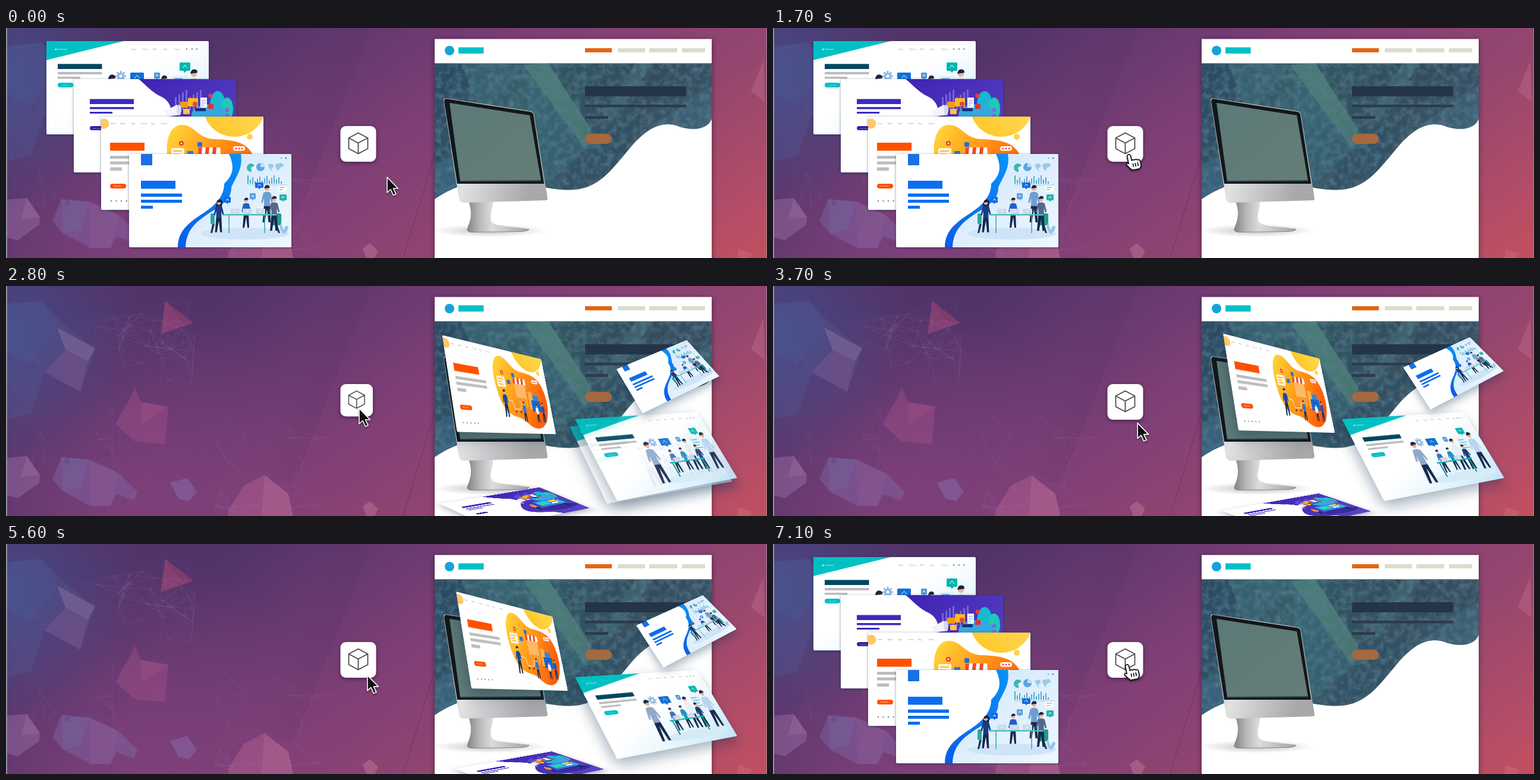
Animation of 1280x387 px, one loop 7.2 s. Source, as an HTML page:

```html
<!DOCTYPE html>
<html lang="en">
<head>
<meta charset="utf-8">
<title>Page designs</title>
<style>
html, body { margin: 0; width: 100%; height: 100%; overflow: hidden; background: #6d3d74; }
#stage { position: absolute; left: 0; top: 0; width: 1280px; height: 387px; overflow: hidden; }
#stage > svg { position: absolute; left: 0; top: 0; }
.card { position: absolute; left: 0; top: 0; width: 273px; height: 157px; border-radius: 2px;
  overflow: hidden; background: #fff; transform-origin: 0 0; }
.card svg { display: block; }
text { font-family: "Open Sans", sans-serif; }
</style>
</head>
<body>
<div id="stage">
<svg id="scene" width="1280" height="387" viewBox="0 0 1280 387">
  <defs>
    <linearGradient id="sky" gradientUnits="userSpaceOnUse" x1="450" y1="-30" x2="950" y2="670">
      <stop offset="0" stop-color="#52346a"/><stop offset=".35" stop-color="#7f3f76"/>
      <stop offset=".62" stop-color="#95466f"/><stop offset=".85" stop-color="#b44d67"/>
      <stop offset="1" stop-color="#c85058"/>
    </linearGradient>
    <radialGradient id="blueGlow" gradientUnits="userSpaceOnUse" cx="0" cy="80" r="220">
      <stop offset="0" stop-color="#41528e" stop-opacity=".7"/><stop offset="1" stop-color="#41528e" stop-opacity="0"/>
    </radialGradient>
    <radialGradient id="plumGlow" gradientUnits="userSpaceOnUse" cx="220" cy="350" r="320">
      <stop offset="0" stop-color="#82417c" stop-opacity=".75"/><stop offset="1" stop-color="#82417c" stop-opacity="0"/>
    </radialGradient>
    <linearGradient id="fold" gradientUnits="userSpaceOnUse" x1="490" y1="130" x2="558" y2="157">
      <stop offset="0" stop-color="#3c2858" stop-opacity="0"/><stop offset="1" stop-color="#3c2858" stop-opacity=".12"/>
    </linearGradient>
    <linearGradient id="hero" x1="0" y1="0" x2="1" y2=".25">
      <stop offset="0" stop-color="#2b4a60"/><stop offset=".42" stop-color="#38626c"/>
      <stop offset=".75" stop-color="#364f5e"/><stop offset="1" stop-color="#3a5668"/>
    </linearGradient>
    <linearGradient id="screen" x1="0" y1="0" x2="1" y2="1">
      <stop offset="0" stop-color="#5b7a78"/><stop offset="1" stop-color="#667d77"/>
    </linearGradient>
    <linearGradient id="chin" x1="0" y1="0" x2="1" y2=".3">
      <stop offset="0" stop-color="#a6a6a8"/><stop offset=".4" stop-color="#e2e2e3"/><stop offset="1" stop-color="#a8a8ab"/>
    </linearGradient>
    <linearGradient id="stand" x1="0" y1="0" x2="1" y2="0">
      <stop offset="0" stop-color="#838385"/><stop offset=".2" stop-color="#b9b9bb"/>
      <stop offset=".4" stop-color="#dcdcde"/><stop offset="1" stop-color="#a3a3a5"/>
    </linearGradient>
    <radialGradient id="floor"><stop offset="0" stop-color="#555" stop-opacity=".4"/><stop offset="1" stop-color="#777" stop-opacity="0"/></radialGradient>
    <linearGradient id="yolk" x1="0" y1="0" x2="1" y2=".5">
      <stop offset="0" stop-color="#ffdc3c"/><stop offset=".5" stop-color="#ff9a18"/><stop offset="1" stop-color="#ff5c0c"/>
    </linearGradient>
    <linearGradient id="sun" x1="0" y1="1" x2="1" y2="0">
      <stop offset="0" stop-color="#ffc420"/><stop offset="1" stop-color="#ffe270"/>
    </linearGradient>
    <linearGradient id="ice" x1="0" y1="0" x2="1" y2="1">
      <stop offset="0" stop-color="#cfe6fb"/><stop offset="1" stop-color="#eef7ff"/>
    </linearGradient>
    <linearGradient id="wave" x1="1" y1="0" x2="0" y2="1">
      <stop offset="0" stop-color="#0aa0ff"/><stop offset="1" stop-color="#0a5ce8"/>
    </linearGradient>
    <linearGradient id="violet" x1="0" y1="0" x2="1" y2="1">
      <stop offset="0" stop-color="#3f22b4"/><stop offset="1" stop-color="#5a48c4"/>
    </linearGradient>
    <linearGradient id="mist" x1="0" y1="0" x2="1" y2="1">
      <stop offset=".45" stop-color="#d2eefb" stop-opacity="0"/><stop offset="1" stop-color="#bfe4f8"/>
    </linearGradient>
    <filter id="grunge" x="0" y="0" width="1" height="1">
      <feTurbulence type="fractalNoise" baseFrequency=".09" numOctaves="4" seed="4"/>
      <feColorMatrix values="0 0 0 0 .1  0 0 0 0 .2  0 0 0 0 .27  1.600 0 0 0 -.62"/>
    </filter>
    <clipPath id="heroShape"><path d="M721 59.500H1187V153C1179 174 1148 172 1130 165C1100 155 1076 172 1052 199C1020 237 999 268 957 272C905 276 860 250 800 257C770 262 745 271 721 288Z"/></clipPath>
  </defs>
  <rect width="1280" height="387" fill="url(#sky)"/>
  <rect width="700" height="387" fill="url(#plumGlow)"/>
  <rect width="300" height="387" fill="url(#blueGlow)"/>
  <path d="M610 0L480 332L400 332L530 0Z" fill="url(#fold)"/>
  <path d="M610 8L490 312M740 150L668 387" stroke="#4a2a58" stroke-opacity=".3" stroke-width="1.5"/>
  <g id="facets" opacity=".72"></g>
  <g id="mesh" stroke="#c9a5c8" stroke-opacity=".13" stroke-width=".6" fill="none"></g>
  <rect width="2" height="387" fill="#9292a2"/><rect x="1279" width="1" height="387" fill="#a08a98"/>

  <rect x="721" y="18.500" width="466" height="400" fill="#fff" style="filter:drop-shadow(0 2px 5px rgba(0,0,0,.45))"/>
  <circle cx="746" cy="38" r="8" fill="#14a3d8"/>
  <g id="nav"></g>
  <g clip-path="url(#heroShape)">
    <rect x="721" y="59" width="466" height="230" fill="url(#hero)"/><g id="heroFacets"></g>
    <rect x="721" y="59" width="466" height="230" filter="url(#grunge)"/>
  </g>
  <g id="copy"></g>

  <ellipse cx="814" cy="341" rx="98" ry="11" fill="url(#floor)"/>
  <path d="M778 291H819C820 302 813 314 816 324C819 333 836 333 880 338Q880 342 866 342.500L784 343.500Q773 343 777 334C784 318 783 306 778 291Z" fill="url(#stand)"/>
  <path d="M776 338Q774 343.500 786 343.500L866 342.500Q880 341 880 338" fill="none" stroke="#77777a" stroke-width=".8"/>
  <path d="M739 118L883 140Q887 141 888 145L911 287Q911 290 907 290L770 294Q764 294 762 288L736 122Q736 118 739 118Z" fill="url(#chin)"/>
  <path d="M739 119L882 141Q886 142 887 145L905 262H759L737 123Z" fill="#121719"/>
  <path d="M746 126L881 147L900 257L764 258Z" fill="url(#screen)"/>
  <path d="M764 258L900 257" stroke="#274247" stroke-width="2"/>
</svg>
<div id="cards"></div>
<svg width="1280" height="387" viewBox="0 0 1280 387">
  <g style="filter:drop-shadow(0 2px 3px rgba(20,0,30,.5))"><rect id="button" x="562.5" y="165" rx="9" fill="#fff"/></g>
  <path id="cube" d="M0 -17.500L16 -9V9L0 17.500L-16 9V-9ZM-16 -9L0 -.5L16 -9M0 -.5V17.500" fill="none" stroke="#4a4a4e" stroke-width="1.800" stroke-linejoin="round"/>
  <g id="cursor" style="filter:drop-shadow(0 2px 1.500px rgba(0,0,0,.45))" stroke-linejoin="round">
    <path id="arrow" d="M0 0V26L6 20.500L10.500 30.500L15 28.500L10.500 19H18.500Z" fill="#111" stroke="#fff" stroke-width="1.600"/>
    <g id="hand" transform="rotate(-12)" stroke="#111" stroke-width="1.700">
      <path d="M-3 3a3 3 0 0 1 6 0V11q2-2 5 0q3-2 5 1q4-1 4 3V19q0 6-4 8H1q-4-4-8-11q0-4 4-1Z" fill="#fff"/>
      <path d="M4 16v6M8 16v6M12 16v6" fill="none"/>
    </g>
  </g>
</svg>
</div>
<script>
const $ = id => document.getElementById(id);
const rect = (x, y, w, h, fill, r = 0) => `<rect x="${x}" y="${y}" width="${w}" height="${h}" rx="${r}" fill="${fill}"/>`;
const dot = (x, y, r, fill) => `<circle cx="${x}" cy="${y}" r="${r}" fill="${fill}"/>`;
const oval = (x, y, rx, ry, fill) => `<ellipse cx="${x}" cy="${y}" rx="${rx}" ry="${ry}" fill="${fill}"/>`;
const path = (d, fill, alpha = 1) => `<path d="${d}" fill="${fill}" fill-opacity="${alpha}"/>`;
const line = (d, stroke, w = 1) => `<path d="${d}" fill="none" stroke="${stroke}" stroke-width="${w}"/>`;
const label = (x, y, s, fill = '#8a93a0', size = 2.8) => `<text x="${x}" y="${y}" font-size="${size}" fill="${fill}">${s}</text>`;
const repeat = (n, f) => Array.from({ length: n }, (_, i) => f(i)).join('');
const menu = (x, y, gap, words) => words.map((w, i) => label(x + i * gap, y, w)).join('');

// Backdrop
$('facets').innerHTML =
  path('M0 30L60 25L95 62L150 105L125 178L65 145L42 215L0 225Z', '#5a6ba6', .26) +
  path('M0 30L60 25L88 70L40 130L0 110Z', '#4a6cac', .16) +
  path('M86 70L150 105L138 127L100 107Z', '#c99fc4', .34) +
  path('M100 107L138 127L125 178L65 145Z', '#a0659e', .35) +
  path('M268 25L315 62L260 81Z', '#c24f7c', .6) + path('M268 25L290 58L315 62Z', '#7c3560', .35) +
  path('M210 186L217 171L227 195L273 203L267 266L216 261L184 232Z', '#b5578e', .45) +
  path('M227 195L273 203L228 232Z', '#d06f98', .2) +
  path('M0 289L35 286L57 318L56 331L20 357L0 352Z', '#b58ac0', .42) + path('M35 286L57 318L25 322Z', '#d0a8cc', .2) +
  path('M93 288L140 292L190 315L221 346L215 361L186 350L176 370L142 370L96 346L78 325Z', '#8172b4', .5) +
  path('M93 288L140 292L125 340L96 346Z', '#6f9ac8', .18) + path('M140 292L190 315L176 370L142 370Z', '#b0719f', .2) +
  path('M276 331L305 323L321 346L308 362L290 358Z', '#8b75b6', .6) +
  path('M374 378L400 336L435 318L475 350L483 387H374Z', '#c06a98', .5) + path('M435 318L430 387H483L475 350Z', '#d98aa6', .25) +
  path('M600 371L612 362L626 375L620 387H606Z', '#d08aa0', .5) +
  path('M1274 55L1253 106L1276 124Z', '#d88aa4', .32) + path('M1232 372L1256 380L1250 387H1230Z', '#e09098', .3) +
  [[47, 134], [103, 294], [171, 284], [197, 362]].map(([x, y]) => dot(x, y, 4.5, '#4a3f7455')).join('');

let seed = 7;
const random = () => (seed = seed * 16807 % 2147483647) / 2147483647;
function net(x, y, w, h, count, reach) {
  const pts = Array.from({ length: count }, () => [x + random() * w, y + random() * h]);
  let d = '';
  pts.forEach((a, i) => pts.slice(i + 1).forEach(b => {
    if (Math.hypot(a[0] - b[0], a[1] - b[1]) < reach) d += `M${a}L${b}`;
  }));
  return `<path d="${d}"/>`;
}
$('mesh').innerHTML = net(120, 20, 210, 160, 40, 52) + net(350, 215, 200, 172, 30, 55) + net(20, 200, 180, 140, 14, 60);

// Page on the right
$('nav').innerHTML = rect(761, 32.5, 42.5, 10.5, '#00c0c9') + rect(974, 34, 45, 7, '#e2660f') +
  [[1029, 46], [1082, 47], [1137, 39]].map(([x, w]) => rect(x, 34, w, 7, '#dbdccf')).join('');
$('heroFacets').innerHTML =
  path('M721 59H765L800 150L721 230Z', '#2a4a66', .45) + path('M765 59L870 62L800 150Z', '#3f7680', .35) +
  path('M870 62L912 59L1003 200L975 205Z', '#5f9f88', .42) + path('M870 62L975 205L900 270L880 140Z', '#33687a', .5) +
  path('M912 59H1060L1030 120L985 170Z', '#2c4858', .45) + path('M1060 59H1090L1022 150L990 165Z', '#4f8b90', .28) +
  path('M1090 59L1187 59V100L1060 140Z', '#33485c', .5) + path('M1187 95V170L1080 170Z', '#3f7088', .35) +
  path('M985 170L1070 150L1010 250L930 275Z', '#2c5068', .45) + path('M721 230L790 200L760 290L721 290Z', '#3c6a92', .45);
$('copy').innerHTML = rect(974, 98, 170, 17, '#253548') + rect(974, 129, 170, 4.5, '#2b3c4b') +
  rect(974, 148, 39, 5, '#2b3c4b') + rect(974, 178, 45, 17, '#a4693f', 8.5);

// Card artwork
const person = (x, y, size, shirt, legs = '#16294d') => `<g transform="translate(${x} ${y})scale(${size / 50})">` +
  path('M-4 22H4L5 46H2L0 28L-3 46H-6Z', legs) + path('M-5 6Q0 3 5 6L8 18L6 19.500L4 13V24H-4V13L-6 20L-8 19Z', shirt) +
  dot(0, 0, 3.2, '#f0b394') + path('M-3.600 0Q-3 -5 1 -4.500Q4 -4 3.600 -1Z', '#1d2440') + '</g>';
const bubble = (x, y, w, h, fill) => rect(x, y, w, h, fill, 1.5) + path(`M${x + w * .35} ${y + h}h${w * .3}l${-w * .15} ${h * .25}Z`, fill) +
  line(`M${x + w * .3} ${y + h * .65}L${x + w * .5} ${y + h * .3}L${x + w * .7} ${y + h * .65}`, '#fff', 1);
const laptop = (x, y) => rect(x, y, 16, 9, '#cfdbe8', 1) + dot(x + 8, y + 4.5, 1, '#fff');

const tealArt = rect(0, 0, 273, 157, 'url(#mist)') + path('M0 0H130L0 32Z', '#00c0c4') + dot(16, 14, 1.3, '#fff') + label(19, 15, 'Studiomark', '#fff') +
  menu(143, 14.5, 18, ['Home', 'Services', 'Work', 'Blog', 'Contact']) + [236, 245, 253].map(x => dot(x, 13.5, 1.2, '#7d8898')).join('') +
  rect(19, 38.5, 74.5, 8.5, '#00465f') + rect(19, 52, 74.5, 4, '#bcbcbc') + rect(19, 60, 38, 3.5, '#bcbcbc') +
  rect(19, 70, 26, 8, '#00bfc4', 4) + label(26, 75, 'Read more', '#fff', 2.5) +
  oval(185, 138, 78, 9, '#d5ecf6') +
  repeat(8, i => `<g transform="rotate(${i * 45} 125 59)">${rect(123.5, 50, 3, 4, '#8cb8e4')}</g>`) + dot(125, 59, 6, '#8cb8e4') + dot(125, 59, 2.5, '#fff') +
  bubble(141, 53, 23, 15, '#126fd6') + bubble(181, 53, 10, 10, '#4f96d8') + bubble(224, 36, 18, 14, '#00b5ad') +
  rect(212, 58, 26, 34, '#e6f2fb') + repeat(4, i => rect(215, 62 + i * 6, 14 + i % 2 * 5, 2, i % 2 ? '#6cc4b8' : '#7fb3e4')) +
  person(152, 82, 48, '#3c6fb8') + person(178, 80, 48, '#1a8fc4') + person(198, 64, 68, '#e8eef6') + person(216, 78, 54, '#1e3a7a') +
  rect(138, 103, 84, 3, '#20b2ae') + path('M142 106h3v28h-3zM214 106h3v28h-3z', '#1a8f98') + laptop(150, 95) + laptop(184, 95) +
  person(110, 64, 84, '#8fa9c8') + person(248, 55, 82, '#b9d4ec');

const purpleArt = path('M109 0H273V157H196C190 140 170 138 150 128C122 112 140 86 158 68C170 52 160 36 148 30C130 22 120 8 109 0Z', 'url(#violet)') +
  rect(27, 33.5, 74, 8.5, '#3b2bb9') + rect(27, 47, 74, 3.5, '#3b2bb9') + rect(27, 55, 38, 3, '#3b2bb9') +
  rect(27, 79, 28, 7, '#3b1fa8', 3.5) + label(32, 84, 'Learn more', '#fff', 2.5) +
  oval(222, 122, 48, 14, '#3b2a9c') + repeat(8, i => rect(170 + i * 6, 30 - i % 4 * 4, 3, 22 + i % 4 * 4, '#7763d8')) +
  oval(242, 44, 13, 24, '#19b8d0') + oval(258, 50, 10, 19, '#21c8b6') + oval(228, 60, 30, 18, '#35a8e0') +
  rect(192, 32, 17, 14, '#ffb81c', 1) + rect(179, 38, 13, 10, '#f39c12', 1) + rect(213, 31, 11, 17, '#f4f6ff', 1) + line('M215 36h7M215 40h7M215 44h4', '#8a96c8') +
  rect(226, 42, 9, 8, '#e0322c', 1) + dot(230, 28, 3.5, '#e63c3c') + dot(204, 42, 4, '#e0483c') + rect(184, 50, 11, 9, '#ffc53a', 1) +
  path('M152 54L174 43L180 60L158 63Z', '#f2f4fa') + oval(177, 52, 4, 9, '#d5daf0') + rect(160, 62, 4, 10, '#c9d0ea') +
  rect(204, 49, 18, 5, '#232a78', 1) + repeat(3, i => dot(258, 52 + i * 9, 3.5, '#7a6ae0')) +
  rect(184, 74, 70, 34, '#2d86e0', 2) + rect(189, 79, 28, 20, '#2fd0c4') + rect(221, 79, 26, 9, '#ffd048') + rect(221, 91, 26, 8, '#f0f4ff') +
  person(170, 82, 44, '#ff9a3c') + person(246, 84, 46, '#27c4c0');

const orangeArt = dot(5, 12, 8.5, '#ffc766') + menu(16, 12.5, 17, ['Home', 'About', 'Pages', 'Services', 'Blog', 'Contact']) +
  dot(224, -19, 53, 'url(#sun)') + dot(250, 34, 5, '#ffcf50') +
  path('M113 78C106 42 115 16 134 14C158 13 160 36 190 38C222 39 246 42 257 68C272 104 254 146 218 147C190 147 186 130 160 127C130 124 117 104 113 78Z', 'url(#yolk)') +
  rect(15, 44, 58, 13.5, '#ff5000') + rect(15, 66, 73, 5, '#bdbdbd') + rect(15, 75.5, 73, 5, '#bdbdbd') + rect(15, 85.5, 20, 5.5, '#bdbdbd') +
  rect(15, 113, 27, 8, '#ff5000', 4) + label(21, 118, 'Shop now', '#fff', 2.8) + repeat(5, i => dot(17 + i * 8.5, 142, 1.2, '#7e848e')) +
  rect(118, 53, 22, 20, '#fff6df', 1) + line('M121 58h15M121 63h10M121 68h13', '#ffb52e', 2) + rect(162, 43, 8, 8, '#1f6fd8', 2) +
  dot(135, 45, 4, '#ea3d2f') + dot(135, 45, 1.5, '#fff') + rect(145, 58, 10, 8, '#2e78dd', 1) +
  rect(166, 60, 32, 46, '#ffb866') + repeat(6, i => path(`M${164 + i * 6} 52h6l1 11h-8z`, i % 2 ? '#fff' : '#ee4a24')) +
  rect(222, 50, 20, 7.5, '#fff', 3.5) + repeat(3, i => dot(227 + i * 5, 53.7, 1.5, '#ee3b3b')) +
  rect(166, 90, 30, 20, '#f79a2c') + rect(203, 76, 13, 34, '#ffb347') + rect(210, 92, 28, 22, '#1666cf') + rect(216, 82, 17, 10, '#2f86ea') +
  line('M138 96L152 98L156 112H174L178 98', '#e8e8f0', 1.5) + dot(158, 117, 2, '#333') + dot(172, 117, 2, '#333') +
  person(132, 82, 50, '#15479c') + person(184, 100, 38, '#2676d8') + person(224, 102, 36, '#fff') + person(244, 98, 40, '#1c54a8');

const blueArt = path('M168 0C180 26 172 38 160 50C160 66 152 78 138 90C116 108 82 120 82 157H273V0Z', 'url(#wave)') +
  path('M188 0C192 24 180 38 172 56C172 76 158 84 142 95C118 110 96 124 95 157H273V0Z', 'url(#ice)') +
  rect(20, 0, 19, 19, '#1a70e6') + rect(20, 45, 58, 13.5, '#0b6df0') + rect(20, 66.5, 69, 5.5, '#0b6df0') + rect(20, 77, 69, 5, '#0b6df0') + rect(20, 87, 20, 5, '#0b6df0') +
  dot(205, 23, 7, '#37b9b2') + path('M205 23L212 19A8 8 0 0 1 207 31Z', '#eaf4ff') + dot(221, 22, 7, '#5ca5e4') + path('M221 22V15A7 7 0 0 1 228 22Z', '#bfe0f8') +
  path('M233 18l8-2 3 5-5 3 2 6-4-4ZM246 17l11-2 4 5-7 3-3 6-4-6Z', '#9cc9e6') +
  repeat(15, i => rect(199 + i * 4, 36 + i * 7 % 11, 2, 14 - i * 7 % 11, i % 3 ? '#5fa8dc' : '#3db6a8')) + line('M199 52H266', '#8cc4d8', .8) +
  dot(256, 7, .9, '#6f7f94') + dot(264, 7, 1.2, '#2d69bf') +
  bubble(212, 48, 14, 9, '#1668dc') + bubble(160, 72, 11, 10, '#1269e0') + bubble(203, 66, 10, 10, '#5c9fe2') + bubble(253, 68, 12, 10, '#20b2aa') +
  rect(251, 53, 14, 10, '#fff') + line('M253 56h9M253 60h6', '#5aa860') + oval(195, 134, 74, 10, '#cfe4f7') +
  person(232, 58, 62, '#6f9fd0') + person(197, 78, 50, '#1e60c8') + rect(137, 100, 7, 18, '#2aa7a6', 2) + rect(240, 100, 16, 20, '#23998c', 2) +
  path('M140 118h4l-4 15h-3zM246 120h4l4 13h-3z', '#1b3d58') +
  path('M146 86Q151 70 157 80L154 106Z', '#141d3c') + person(151, 82, 54, '#183c86') + person(244, 76, 58, '#55678f') +
  rect(158, 101, 90, 2.5, '#4dc0ba') + line('M168 103V133M228 103V133', '#2d9fa0', 1.4) + laptop(170, 92) + laptop(191, 92) + laptop(213, 92) +
  path('M260 135Q249 122 256 116Q258 124 260 128Q263 118 268 122Q268 130 260 135Z', '#9cc4e8');

const box = (x, y) => [x, y, x + 273, y, x + 273, y + 157, x, y + 157];
const specs = [
  { art: tealArt, from: box(68, 22), to: [984, 245, 1190, 231, 1257, 335, 1049, 374], ghost: true },
  { art: tealArt, to: [957, 224, 1163, 212, 1230, 323, 1028, 362], settles: true },
  { art: purpleArt, from: box(114, 86), to: [755, 378, 918, 349, 1006, 379, 843, 413] },
  { art: orangeArt, from: box(160, 149), to: [757, 80, 919, 122, 945, 247, 783, 243] },
  { art: blueArt, from: box(207, 212), to: [1060, 137, 1172, 86, 1229, 143, 1106, 208] }
];
const cards = specs.map(spec => {
  const el = document.createElement('div');
  el.className = 'card';
  el.innerHTML = `<svg width="273" height="157" viewBox="0 0 273 157">${spec.art}</svg>`;
  $('cards').append(el);
  return { ...spec, el };
});

// Projective transform from the card's rectangle to a quad
function project([x0, y0, x1, y1, x2, y2, x3, y3], w = 273, h = 157) {
  const ax = x1 - x2, ay = y1 - y2, bx = x3 - x2, by = y3 - y2;
  const sx = x0 - x1 + x2 - x3, sy = y0 - y1 + y2 - y3, det = ax * by - bx * ay;
  const g = (sx * by - bx * sy) / det, k = (ax * sy - sx * ay) / det;
  const m = [(x1 - x0 + g * x1) / w, (y1 - y0 + g * y1) / w, 0, g / w,
    (x3 - x0 + k * x3) / h, (y3 - y0 + k * y3) / h, 0, k / h, 0, 0, 1, 0, x0, y0, 0, 1];
  return `matrix3d(${m.map(v => v.toFixed(8))})`;
}

// Motion
const clamp = v => Math.min(1, Math.max(0, v));
const mix = (a, b, u) => a + (b - a) * u;
const ease = u => (1 - Math.cos(Math.PI * clamp(u))) / 2;
function track(keys, t, i = 1) {
  const n = keys.findIndex(k => k[0] > t);
  if (n < 0) return keys[keys.length - 1][i];
  if (!n) return keys[0][i];
  const a = keys[n - 1], b = keys[n];
  return mix(a[i], b[i], (t - a[0]) / (b[0] - a[0]));
}
const pointer = [[900, 641, 251], [1700, 598, 213], [2800, 594, 206], [4300, 626, 247], [4800, 626, 247], [6300, 592, 198], [7100, 595, 203]];
const sizes = [[1700, 60], [1900, 54.5], [2900, 54.5], [3300, 60], [3900, 60], [4200, 54.5], [4900, 54.5],
  [5500, 60], [6400, 60], [6600, 54.5], [6800, 54.5], [7000, 60]];

function draw(t) {
  const p = t < 5000 ? ease((t - 1800) / 1145) : 1 - ease((t - 6350) / 700);
  for (const { el, from, to, ghost, settles } of cards) {
    const quad = settles ? to : to.map((v, i) => mix(from[i], v, p));
    const alpha = settles ? clamp((p - .85) / .12) : ghost ? clamp((1 - p) / .05) : 1;
    el.style.transform = project(quad);
    el.style.opacity = alpha;
    el.style.visibility = alpha ? 'visible' : 'hidden';
    el.style.boxShadow = `${-p * 6}px ${1 + p * 9}px ${4 + p * 22}px rgba(10,45,75,${.5 - p * .12})`;
  }
  const size = track(sizes, t);
  $('button').setAttribute('width', size);
  $('button').setAttribute('height', size);
  $('cube').setAttribute('transform', `translate(${562.5 + size / 2} ${164 + size / 2})scale(${1 - (60 - size) * .03})`);
  const pointing = t >= 1500 && t < 2000 || t >= 6500;
  $('arrow').style.display = pointing ? 'none' : '';
  $('hand').style.display = pointing ? '' : 'none';
  $('cursor').setAttribute('transform', `translate(${track(pointer, t, 1)} ${track(pointer, t, 2)})`);
}

const start = performance.now();
function frame() {
  const t = (performance.now() - start) % 7200;
  draw(Math.floor(t / 100) * 100);
  requestAnimationFrame(frame);
}
frame();
</script>
</body>
</html>
```
